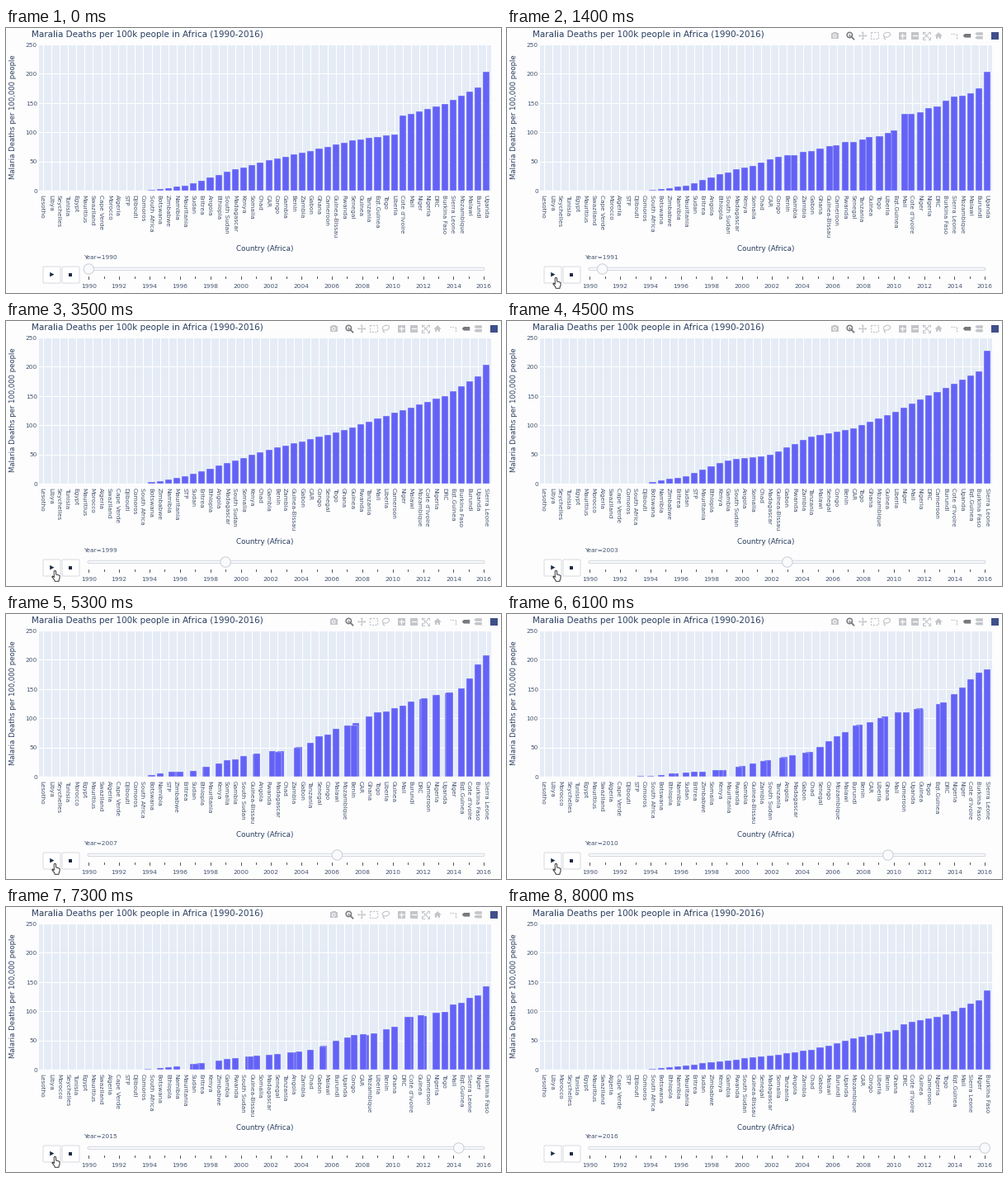
Write a matplotlib script that moves like this. It is 600x321 px and loops after 8.2 s.

```python
import matplotlib.pyplot as plt
import numpy as np
from matplotlib.animation import FuncAnimation
from matplotlib.patches import Circle, Ellipse, FancyBboxPatch, Polygon, Rectangle

W, H, DPI = 600, 321, 100
FRAMES, STEP = 82, 100
PT = 72 / DPI
START, PER_YEAR = 1252, 250
FIRST, LAST = 1990, 2016
LEFT, RIGHT, TOP, BASE = 39.5, 587.5, 20, 197
INK, SOFT_INK, BAR, PANEL = "#2a3f5f", "#44546f", "#6462f6", "#e5ecf6"
PAGE, EDGE, DARK = "#fdfdfe", "#cbcfd6", "#1d2c46"

# Countries from lowest to highest rate
RANKED = {
    1990: "Lesotho,Libya,Seychelles,Tunisia,Egypt,Mauritius,Swaziland,Cape Verde,Morocco,"
          "Algeria,STP,Djibouti,Comoros,South Africa,Botswana,Zimbabwe,Namibia,Mauritania,"
          "Sudan,Eritrea,Angola,Ethiopia,South Sudan,Madagascar,Kenya,Somalia,Chad,CAR,"
          "Congo,Gambia,Benin,Zambia,Gabon,Ghana,Cameroon,Guinea-Bissau,Rwanda,Senegal,"
          "Guinea,Tanzania,Eqt.Guinea,Togo,Liberia,Cote d'Ivoire,Mali,Niger,Nigeria,DRC,"
          "Burkina Faso,Sierra Leone,Mozambique,Malawi,Burundi,Uganda",
    1995: "Lesotho,Libya,Seychelles,Tunisia,Egypt,Mauritius,Swaziland,Morocco,Algeria,"
          "Cape Verde,Djibouti,STP,Comoros,South Africa,Botswana,Zimbabwe,Namibia,"
          "Mauritania,Sudan,Eritrea,Angola,Ethiopia,South Sudan,Madagascar,Somalia,Kenya,"
          "Chad,Gambia,CAR,Congo,Benin,Zambia,Gabon,Guinea-Bissau,Ghana,Tanzania,Senegal,"
          "Togo,Rwanda,Cameroon,Guinea,Liberia,Mali,Niger,Cote d'Ivoire,Eqt.Guinea,Malawi,"
          "DRC,Nigeria,Mozambique,Burkina Faso,Sierra Leone,Burundi,Uganda",
    1999: "Lesotho,Libya,Seychelles,Tunisia,Egypt,Mauritius,Morocco,Algeria,Swaziland,"
          "Cape Verde,Djibouti,Comoros,South Africa,Botswana,Zimbabwe,Namibia,Mauritania,"
          "STP,Sudan,Eritrea,Ethiopia,Angola,Madagascar,South Sudan,Somalia,Kenya,Chad,"
          "Gambia,Benin,Zambia,Guinea-Bissau,Gabon,CAR,Congo,Senegal,Togo,Ghana,Guinea,"
          "Rwanda,Tanzania,Mali,Liberia,Cameroon,Niger,Malawi,Mozambique,Cote d'Ivoire,"
          "Nigeria,DRC,Eqt.Guinea,Burkina Faso,Burundi,Uganda,Sierra Leone",
    2003: "Lesotho,Libya,Seychelles,Tunisia,Egypt,Mauritius,Morocco,Algeria,Swaziland,"
          "Cape Verde,Comoros,South Africa,Djibouti,Botswana,Namibia,Zimbabwe,Eritrea,"
          "Sudan,STP,Mauritania,Ethiopia,Kenya,Gambia,South Sudan,Angola,Somalia,Chad,"
          "Madagascar,Guinea-Bissau,Gabon,Rwanda,Zambia,Tanzania,Malawi,Senegal,Congo,"
          "Benin,CAR,Togo,Ghana,Mozambique,Guinea,Liberia,Niger,Mali,Nigeria,DRC,Cameroon,"
          "Burundi,Cote d'Ivoire,Uganda,Eqt.Guinea,Burkina Faso,Sierra Leone",
    2010: "Lesotho,Libya,Morocco,Seychelles,Tunisia,Egypt,Mauritius,Swaziland,Algeria,"
          "Cape Verde,Djibouti,STP,Comoros,South Africa,Botswana,Ethiopia,Namibia,Sudan,"
          "Eritrea,Zimbabwe,Somalia,Kenya,Mauritania,Rwanda,Gambia,Guinea-Bissau,Zambia,"
          "South Sudan,Tanzania,Angola,Madagascar,Gabon,Chad,Senegal,Congo,Mozambique,"
          "Malawi,Burundi,Benin,CAR,Liberia,Ghana,Mali,Cameroon,Uganda,Guinea,Togo,"
          "Eqt.Guinea,DRC,Nigeria,Niger,Cote d'Ivoire,Burkina Faso,Sierra Leone",
    2013: "Lesotho,Libya,Morocco,Seychelles,Tunisia,Egypt,Mauritius,Swaziland,Algeria,"
          "Cape Verde,Djibouti,STP,South Africa,Comoros,Botswana,Ethiopia,Kenya,Namibia,"
          "Sudan,Eritrea,Mauritania,Zimbabwe,Somalia,Gambia,Rwanda,South Sudan,"
          "Guinea-Bissau,Zambia,Madagascar,Tanzania,Angola,Senegal,Chad,Malawi,Gabon,Congo,"
          "Burundi,Liberia,CAR,Uganda,Mozambique,Benin,Ghana,Cameroon,Guinea,DRC,Togo,"
          "Nigeria,Cote d'Ivoire,Mali,Eqt.Guinea,Sierra Leone,Niger,Burkina Faso",
    2016: "Lesotho,Libya,Morocco,Seychelles,Tunisia,Egypt,Mauritius,Swaziland,Algeria,"
          "Cape Verde,STP,Djibouti,Comoros,South Africa,Botswana,Ethiopia,Namibia,"
          "Mauritania,Eritrea,Sudan,Zimbabwe,Kenya,Gambia,Rwanda,South Sudan,Guinea-Bissau,"
          "Senegal,Madagascar,Somalia,Tanzania,Angola,Zambia,Chad,Gabon,Malawi,Burundi,"
          "Uganda,Mozambique,CAR,Congo,Liberia,Benin,Ghana,DRC,Cote d'Ivoire,Guinea,"
          "Cameroon,Nigeria,Togo,Eqt.Guinea,Mali,Sierra Leone,Niger,Burkina Faso",
}
RANKED = {y: names.split(",") for y, names in RANKED.items()}

# Rates at a few ranks, linear in between
KNOTS = [13, 18, 23, 28, 33, 38, 43, 44, 49, 53, 54]
CURVE = {
    1990: [0, 8, 32, 52, 68, 86, 96, 128, 148, 176, 203],
    1995: [0, 9, 33, 59, 71, 88, 119, 130, 149, 178, 196],
    1999: [0, 12, 35, 58, 76, 96, 121, 125, 150, 184, 204],
    2003: [0, 13, 40, 49, 81, 94, 123, 130, 164, 192, 228],
    2010: [0, 7, 11, 28, 42, 84, 108, 108, 126, 180, 181],
    2013: [0, 7, 20, 27, 34, 60, 79, 96, 103, 139, 151],
    2016: [0, 7, 16, 24, 34, 53, 68, 78, 94, 119, 135],
}

NAMES = RANKED[FIRST]
N = len(NAMES)
SLOT = (RIGHT - LEFT) / N


def key_rates(year):
    place = np.array([RANKED[year].index(n) + 1 for n in NAMES])
    # the tiny slope keeps ties in rank order
    return np.interp(place, KNOTS, CURVE[year]) + place * 1e-3


keys = list(CURVE)
known = np.array([key_rates(y) for y in keys])
years = np.arange(FIRST, LAST + 1)
rates = np.array([np.interp(years, keys, column) for column in known.T]).T
# years between the key years wobble, so neighbours trade places
wobble = np.random.default_rng(4).normal(0, 0.022, rates.shape)
rates *= 1 + wobble * ~np.isin(years, keys)[:, None]
orders = np.argsort(rates, axis=1)
ranks = np.argsort(orders, axis=1)

fig = plt.figure(figsize=(W / DPI, H / DPI), dpi=DPI, facecolor=PAGE)
ax = fig.add_axes([0, 0, 1, 1])
ax.set(xlim=(0, W), ylim=(H, 0))
ax.axis("off")


def put(patch, z=3):
    patch.set_zorder(z)
    return ax.add_patch(patch)


def line(xs, ys, color, width, z=2, **kw):
    return ax.plot(xs, ys, color=color, lw=width * PT, zorder=z, **kw)[0]


def text(x, y, s, size=7.35, **kw):
    kw = {"va": "baseline", "color": INK, **kw}
    return ax.text(x, y, s, fontsize=size * PT, family="DejaVu Sans", zorder=4, **kw)


def slot_x(rank):
    return LEFT + (rank + 0.5) * SLOT


def rate_y(rate):
    return BASE - rate * (BASE - TOP) / 250


def year_x(year):
    return 100.3 + (year - FIRST) * 18.42


# Plot panel
put(Rectangle((LEFT, TOP), RIGHT - LEFT, BASE - TOP, fc=PANEL, lw=0), 1)
for r in range(N):
    line([slot_x(r)] * 2, [TOP, BASE], "white", 1.1)
for v in range(0, 251, 50):
    line([LEFT, RIGHT], [rate_y(v)] * 2, "white", 1.3 if v == 0 else 1)
    text(37.8, rate_y(v) + 2.7, str(v), ha="right", color=SOFT_INK)
text(31, 10.6, "Maralia Deaths per 100k people in Africa (1990-2016)", 10.33)
text(313.5, 270.5, "Country (Africa)", 8.75, ha="center")
text(8.4, 108, "Malaria Deaths per 100,000 people", 8.5, ha="center", va="center", rotation=90)

bars = [put(Rectangle((0, BASE), SLOT * 0.8, 0, fc=BAR, ec=PANEL, lw=0.3)) for _ in NAMES]
labels = [text(slot_x(r) - 0.9, 202, "", ha="center", va="top", rotation=-90, color=SOFT_INK)
          for r in range(N)]

# Slider and buttons
year_label = text(94, 280, "", color=SOFT_INK)
put(FancyBboxPatch((99, 290.2), 481, 3.4, boxstyle="round,pad=0,rounding_size=1.7",
                   fc="#f8fafc", ec=EDGE, lw=0.8 * PT))
for y in years:
    even = y % 2 == 0
    line([year_x(y)] * 2, [301, 304 if even else 303], "#444444", 0.9)
    if even:
        text(year_x(y), 315, str(y), ha="center", color=SOFT_INK)
grip = put(Circle((year_x(FIRST), 292), 6.2, fc="#f8fafc", ec=EDGE, lw=PT), 5)
for x in (45, 68):
    put(FancyBboxPatch((x, 289), 21, 20, boxstyle="round,pad=0,rounding_size=1.2",
                       fc="white", ec="#d3d7dd", lw=0.9 * PT))
put(Polygon([(53.2, 295.8), (58.4, 298.6), (53.2, 301.4)], fc=DARK, lw=0), 4)
put(Rectangle((76.4, 296.6), 3.9, 3.9, fc=DARK, lw=0), 4)


def toolbar():
    pale, dark = "#c3c5c9", "#77797d"
    parts = []

    def fill(patch, color=pale, z=6):
        patch.set(fc=color, lw=0)
        parts.append(put(patch, z))

    def hollow(patch, color=pale, width=1.1, style="-"):
        patch.set(fc="none", ec=color, lw=width * PT, ls=style)
        parts.append(put(patch, 6))

    def stroke(xs, ys, color=pale, width=1.2, z=6, **kw):
        parts.append(line(xs, ys, color, width, z, **kw))

    def tag(x, y, h, color):
        fill(Polygon([(x, y), (x + 2.2, y - h / 2), (x + 9.5, y - h / 2),
                      (x + 9.5, y + h / 2), (x + 2.2, y + h / 2)]), color)

    # camera
    fill(Rectangle((392.5, 6), 9.5, 7))
    fill(Rectangle((395, 4.8), 4.5, 2))
    fill(Circle((397.2, 9.5), 2.3), PAGE, 7)
    fill(Circle((397.2, 9.5), 1.3), pale, 8)
    # zoom
    hollow(Circle((415.3, 8.5), 3.2), dark, 1.5)
    stroke([417.8, 420.4], [11, 13.6], dark, 1.8)
    stroke([414, 416.6], [8.5, 8.5], dark, 0.7)
    stroke([415.3, 415.3], [7.2, 9.8], dark, 0.7)
    # pan
    stroke([427, 435], [9.3, 9.3])
    stroke([431, 431], [5.3, 13.3])
    for dx, dy in ((1, 0), (-1, 0), (0, 1), (0, -1)):
        x, y = 431 + 3.2 * dx, 9.3 + 3.2 * dy
        fill(Polygon([(x + 1.9 * dx, y + 1.9 * dy), (x + 1.6 * dy, y + 1.6 * dx),
                      (x - 1.6 * dy, y - 1.6 * dx)]))
    # box select, lasso
    hollow(Rectangle((441.3, 5.2), 8.6, 8.2), pale, 1.2, (0, (1.8, 1.2)))
    hollow(Ellipse((460.5, 8.2), 8.4, 5.6, angle=-15))
    stroke([457.5, 457, 458.6], [10.6, 12.4, 13.8])
    # zoom in and out
    for x in (475, 489.7):
        fill(Rectangle((x, 5), 8.8, 8.6))
        stroke([x + 2, x + 6.8], [9.3, 9.3], PAGE, 1.3, 7)
    stroke([479.4, 479.4], [6.9, 11.7], PAGE, 1.3, 7)
    # autoscale
    for sx in (-1, 1):
        for sy in (-1, 1):
            x, y = 508.5 + 4.2 * sx, 9.3 + 4.2 * sy
            stroke([508.5, x], [9.3, y], pale, 1)
            stroke([x - 2.2 * sx, x, x], [y, y, y - 2.2 * sy], pale, 1)
    # home
    fill(Polygon([(518.5, 9.6), (523.2, 5.2), (527.9, 9.6)]))
    fill(Rectangle((520, 9.2), 6.4, 4))
    fill(Rectangle((522.3, 10.8), 1.8, 2.4), PAGE, 7)
    # spike lines, hover modes
    stroke([538, 544], [6.5, 6.5], ls=(0, (1.4, 0.9)))
    stroke([544.6, 544.6], [6.5, 13.5], ls=(0, (2, 0.9)))
    tag(552.7, 9.3, 4.6, dark)
    tag(567.3, 7, 3.6, pale)
    tag(567.3, 11.7, 3.6, pale)
    fill(Rectangle((586.8, 4.8), 9, 9), "#3f4f8a")
    return parts


tools = toolbar()
HAND = np.array([(0, 0), (1.6, 0.2), (1.9, 4.6), (3.4, 4.7), (4.9, 5.3), (6.2, 6), (6.3, 9),
                 (5.3, 11.2), (5.2, 12.8), (0.4, 12.8), (-0.2, 11), (-3, 7.4), (-2.2, 6.5),
                 (-0.5, 8), (-0.6, 0.6)])
cursor = put(Polygon(HAND, fc="white", ec="#222222", lw=0.9 * PT, joinstyle="round"), 9)


def ease_out(u, power=2):
    return 1 - (1 - u) ** power


def mix(a, b, u):
    return a + (b - a) * u


def update(i):
    t = i * STEP
    phase = np.clip((t - START) / PER_YEAR, 0, LAST - FIRST)
    k = min(int(phase), LAST - FIRST - 1)
    u = phase - k
    shown = k + 1 if phase > 0 else 0

    move = ease_out(u, 2.6)
    xs = slot_x(mix(ranks[k], ranks[k + 1], move))
    tops = rate_y(mix(rates[k], rates[k + 1], move))
    for bar, x, top in zip(bars, xs, tops):
        bar.set_bounds(x - SLOT * 0.4, top, SLOT * 0.8, BASE - top)
        bar.set_visible(BASE - top > 0.2)
    for label, c in zip(labels, orders[shown]):
        label.set_text(NAMES[c])
    year_label.set_text(f"Year={FIRST + shown}")
    grip.set_center((year_x(FIRST + k + ease_out(u)), 292))

    alpha = np.interp(t, [600, 800, 7800, 8000], [0, 1, 1, 0])
    for part in tools:
        part.set_alpha(alpha)
    enter = ease_out(np.clip((t - 700) / 400, 0, 1))
    cursor.set_xy(HAND + [mix(70, 58.8, enter), mix(316, 302.5, enter)])
    cursor.set_visible(700 <= t < 7800)
    return []


anim = FuncAnimation(fig, update, frames=FRAMES, interval=STEP, init_func=lambda: [],
                     repeat=True, repeat_delay=0, blit=False)
plt.show()
```
